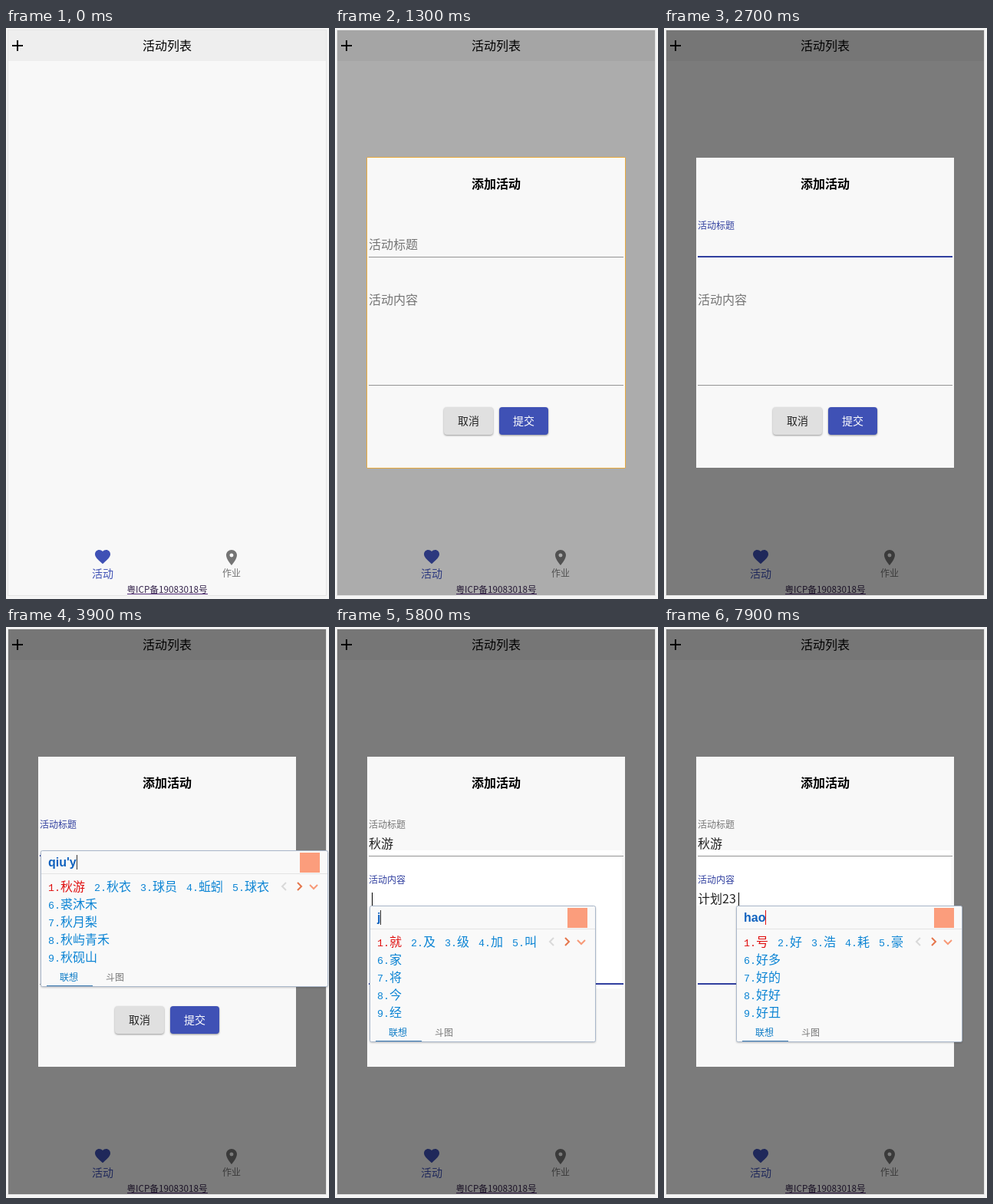
Recreate the animation shown at these times as an HTML page. Size 421 by 744 pixels, loop 8 s.

```html
<!DOCTYPE html>
<html lang="zh-CN">
<head>
<meta charset="utf-8">
<style>
html, body { margin: 0; width: 100%; height: 100%; overflow: hidden; background: #f5f5f5; }
svg { display: block; width: 100vw; height: 100vh; }
text { font: 16px "Noto Sans CJK SC", "Noto Sans CJK", "Noto Sans", sans-serif; white-space: pre; }
.mid { text-anchor: middle; }
.s14 { font-size: 14px; }
.s12 { font-size: 12px; }
.btn { filter: drop-shadow(0 1px 1.2px rgba(0, 0, 0, .4)); }
#typed { font: bold 16px "Liberation Sans", Arial, sans-serif; fill: #1062bf; }
.num { font: 13.33px "Liberation Mono", monospace; }
#panel { filter: drop-shadow(0 1px 1px rgba(0, 0, 0, .2)); }
</style>
</head>
<body>
<svg viewBox="0 0 421 744">
  <rect x="2.5" y="2.5" width="415" height="737" fill="#f8f8f8" stroke="#e5e5e5"/>
  <rect x="3" y="3" width="414" height="40" fill="#eee"/>
  <path d="M8 23h14M15 16v14" stroke="#000" stroke-width="2"/>
  <text class="mid" x="210" y="29">活动列表</text>
  <path transform="translate(114 677)" fill="#3f51b5" d="M12 21.35l-1.45-1.32C5.4 15.36 2 12.28 2 8.5 2 5.42 4.42 3 7.5 3c1.74 0 3.41.81 4.5 2.09C13.09 3.81 14.76 3 16.5 3 19.58 3 22 5.42 22 8.5c0 3.78-3.4 6.86-8.55 11.54z"/>
  <path transform="translate(282 678)" fill="#757575" d="M12 2C8.13 2 5 5.13 5 9c0 5.25 7 13 7 13s7-7.75 7-13c0-3.87-3.13-7-7-7zm0 9.5a2.5 2.5 0 0 1 0-5 2.5 2.5 0 0 1 0 5z"/>
  <text class="mid s14" x="126" y="716" fill="#3f51b5">活动</text>
  <text class="mid s12" x="294" y="715" fill="#757575">作业</text>
  <text class="mid" x="210" y="736" fill="#33224a" style="font-size:11.7px">粤ICP备19083018号</text>
  <path d="M158 737.5h105" stroke="#4b2470"/>
  <rect id="shade" x="3" y="3" width="414" height="736"/>

  <g id="modal">
    <rect x="42" y="169" width="336" height="404" fill="#f8f8f8"/>
    <rect id="outline" x="41.5" y="168.5" width="337" height="405" rx="1" fill="none" stroke="#e8a93c"/>
    <rect id="patch" x="43" y="291" width="331" fill="#fff"/>
    <text class="mid" x="210" y="209" font-weight="bold" style="font-weight:bold">添加活动</text>
    <path d="M44 298.5h332M44 465.5h332" stroke="#949494"/>
    <rect id="line1" y="297" height="2" fill="#303f9f"/>
    <rect id="line2" y="464" height="2" fill="#303f9f"/>
    <text id="label1" y="14">活动标题</text>
    <text id="label2" y="14">活动内容</text>
    <text id="value1" x="44" y="288" fill="#222"></text>
    <text id="value2" x="44" y="360" fill="#222"></text>
    <rect id="caret" width="1" height="17"/>
    <rect class="btn" x="142" y="494" width="64" height="36" rx="4" fill="#e0e0e0"/>
    <rect class="btn" x="214" y="494" width="64" height="36" rx="4" fill="#3f51b5"/>
    <text class="mid s14" x="174" y="517" fill="#222">取消</text>
    <text class="mid s14" x="246" y="517" fill="#fff" style="font-weight:500">提交</text>
  </g>

  <g id="ime">
    <rect id="panel" x=".5" y=".5" height="177" rx="2" fill="#f9f9f9" stroke="#a9b7ca"/>
    <path id="rule" stroke="#e3e3e3"/>
    <text id="typed" x="10" y="21"></text>
    <rect id="bar" y="6" width="1" height="19"/>
    <g id="words"></g>
    <g id="tools" fill="none" stroke-width="2">
      <path d="M-55 42l-5 5 5 5" stroke="#d9d9d9"/>
      <path d="M-40 42l5 5-5 5" stroke="#e5764c"/>
      <path d="M-24 45l5 5 5-5" stroke="#f79a78"/>
      <rect x="-37" y="3" width="26" height="26" fill="#fb9d7c"/>
    </g>
    <text class="s12" x="25" y="170" fill="#0f7cc6">联想</text>
    <text class="s12" x="85" y="170" fill="#777">斗图</text>
    <path d="M8 176.5h60" stroke="#3b78ad"/>
  </g>
</svg>
<script>
const LOOP = 8000, STEP = 100;
const $ = id => document.getElementById(id);
const set = (id, attrs) => {
  for (const k in attrs) $(id).setAttribute(k, attrs[k]);
};
// last entry whose start time has passed
const at = (list, t) => list.findLast(e => e[0] <= t);

// cubic-bezier(x1, 0, x2, 1)
function bezier(x, x1, x2) {
  if (x <= 0) return 0;
  if (x >= 1) return 1;
  let lo = 0, hi = 1, s;
  for (let i = 0; i < 30; i++) {
    s = (lo + hi) / 2;
    const r = 1 - s;
    if (3 * s * r * r * x1 + 3 * s * s * r * x2 + s ** 3 < x) lo = s;
    else hi = s;
  }
  return 3 * s * s * (1 - s) + s ** 3;
}

const carets = [
  [0, 0], [2300, 44], [2700, 0], [3200, 48], [3700, 0], [4200, 48], [4400, 76],
  [4600, 44], [5000, 0], [5500, 44], [5800, 48], [6300, 0], [6700, 48],
  [6800, 76], [7000, 85], [7200, 94], [7700, 97]
];
const contents = [[0, ""], [6800, "计划"], [7000, "计划2"], [7200, "计划23"]];

// time, typed letters, candidates
const qiuy = "秋游 秋衣 球员 蚯蚓 球衣 裘沐禾 秋月梨 秋屿青禾 秋砚山";
const inputs = [
  [0, ""],
  [3200, "q", "去 起 前 请 其 全 却 钱 期"],
  [3400, "qi", "起 其 期 七 其 器 齐 妻 奇"],
  [3500, "qiu", "求 秋 球 丘 其 求助 秋天 球场 秋季"],
  [3900, "qiu'y", qiuy],
  [4000, "qiu'yo", qiuy],
  [4100, "qiu'you", "秋游 球友 求 秋 球 秋游记 求友 秋游去 秋游啦"],
  [4400, ""],
  [5800, "j", "就 及 级 加 叫 家 将 今 经"],
  [5900, "ji", "及 级 几 记 机 即 既 急 极"],
  [6200, "ji'h", "计划 集合 机会 激活 几乎 计划书 集合了 几号 机会来了"],
  [6300, "ji'hu", "几乎 计划 激化 极化 机户 几乎是 几乎没有 几乎都 计划中"],
  [6400, "ji'hua", "计划 激化 极化 季华 机化 计划完成 计划于 计划哇 计划开始"],
  [6800, ""],
  [7700, "h", "和 好 会 还 后 很 话 或 号"],
  [7900, "hao", "号 好 浩 耗 豪 好多 好的 好好 好丑"]
];

let shown;
function drawInput(entry) {
  if (shown === entry) return;
  shown = entry;
  const [time, typed, list] = entry;
  $("ime").style.display = typed ? "" : "none";
  if (!typed) return;

  let x = 10, html = "";
  list.split(" ").forEach((word, i) => {
    const row = Math.max(0, i - 4);
    html += `<text x="${row ? 10 : x}" y="${53 + 23 * row}" fill="${i ? "#0b84d4" : "#e01010"}">` +
      `<tspan class="num">${i + 1}.</tspan>${word}</text>`;
    if (!row) x += 28 + 16 * word.length;
  });
  const w = x + 65;
  $("words").innerHTML = html;
  $("typed").textContent = typed;
  set("ime", { transform: `translate(${time < 7700 ? 45 : 94} ${time < 5000 ? 291 : 363})` });
  set("panel", { width: w - 1 });
  set("rule", { d: `M1 30.5H${w - 1}` });
  set("tools", { transform: `translate(${w} 0)` });
  set("bar", {
    x: Math.round(10 + $("typed").getComputedTextLength()),
    fill: time < 7700 ? "#333" : "#e01010"
  });
}

function drawField(n, top, shrink, focus) {
  const scale = 1 - .25 * shrink;
  set("label" + n, {
    transform: `translate(44 ${top + 24 - 22.5 * shrink}) scale(${scale})`,
    fill: `color-mix(in srgb, #303f9f ${focus * 100}%, #757575)`
  });
  set("line" + n, { x: 210 - 166 * focus, width: 332 * focus });
}

function draw(t) {
  const open = t >= 1200;
  const fade = bezier((t - 1100) / 500, .4, .2);
  set("shade", { opacity: open ? .5 * fade : 0 });
  set("modal", { opacity: open ? Math.min(1, .83 + (t - 1200) / 500) : 0 });
  set("outline", { opacity: t < 2300 ? 1 : 0 });
  set("patch", { height: t < 4400 ? 0 : t < 6800 ? 180 : 72 });

  const first = bezier((t - 2270) / 200, 0, .2);
  const second = bezier((t - 4538) / 200, 0, .2);
  drawField(1, 250, first, first * (1 - second));
  drawField(2, 322, second, second);

  $("value1").textContent = t < 4400 ? "" : "秋游";
  $("value2").textContent = at(contents, t)[1];
  const x = at(carets, t)[1];
  set("caret", { x, y: t < 4600 ? 274 : 346, opacity: x ? 1 : 0 });
  drawInput(at(inputs, t));
}

function tick() {
  const t = performance.now() % LOOP;
  draw(Math.floor(t / STEP) * STEP);
  requestAnimationFrame(tick);
}
tick();
</script>
</body>
</html>
```
